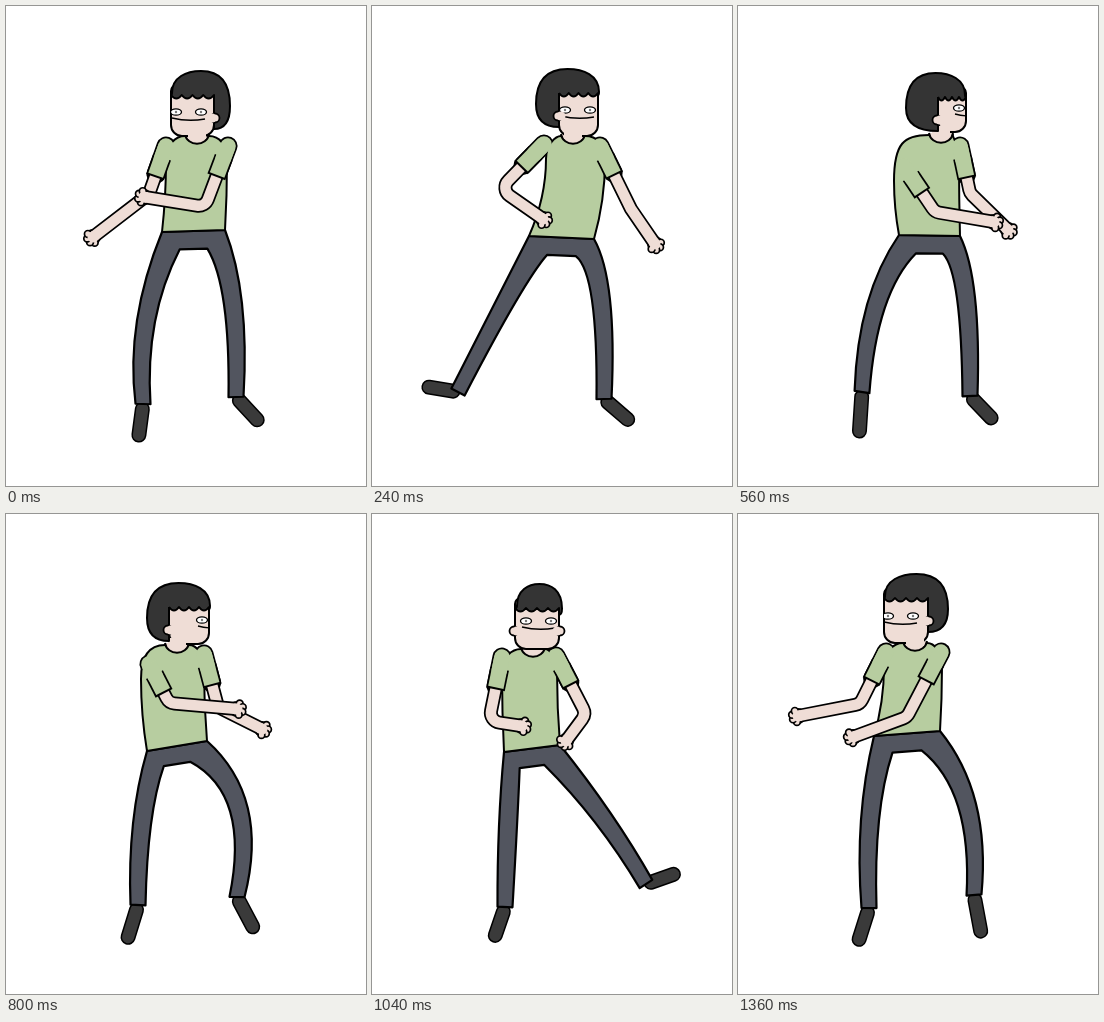
Animation, 360 px wide and 480 px high, one loop 1440 ms. Source, as an HTML page with a canvas:

```html
<!DOCTYPE html>
<html lang="en">
<head>
<meta charset="utf-8">
<title>Dancing figure</title>
<style>
  html, body { margin: 0; width: 100%; height: 100%; overflow: hidden; background: #fff; }
  canvas { display: block; }
</style>
</head>
<body>
<canvas id="stage" width="360" height="480"></canvas>
<script>
const ctx = document.getElementById('stage').getContext('2d');
const LOOP = 1440, STEP = 80;
const SKIN = '#efddd6', SHIRT = '#b7cda0', PANTS = '#52555f', HAIR = '#343434', SHOE = '#3a3a3a', INK = '#000';

// Key poses: one row per entry in TIMES.
const TIMES = [0, 240, 560, 800, 1040, 1200, 1360];

// hair left, hair right, face left, face right, top, chin, left eye x, eye y
const HEAD = [
  [166, 224, 165, 208, 65, 130, 170, 106],
  [164, 227, 187, 226, 63, 130, 193, 104],
  [168, 227, 200, 228, 67, 126, 221, 102],
  [141, 204, 163, 203, 69, 130, 196, 106],
  [145, 190, 143, 187, 70, 135, 154, 107],
  [138, 199, 136, 180, 69, 127, 137, 103],
  [147, 210, 146, 190, 60, 129, 150, 102]
];
// waist left x y, waist right x y, left side x, right side x, neck x y
const TORSO = [
  [156, 226, 219, 224, 160, 221, 191, 130],
  [157, 230, 222, 233, 174, 233, 201, 130],
  [161, 229, 222, 230, 156, 221, 203, 129],
  [141, 237, 201, 227, 135, 198, 171, 131],
  [132, 238, 188, 231, 130, 185, 161, 135],
  [131, 233, 187, 229, 128, 186, 163, 128],
  [136, 222, 202, 217, 146, 204, 177, 129]
];
// shoulder, elbow, hand of the left arm, then of the right arm
const ARMS = [
  [160, 140, 143, 188, 87, 231, 222, 140, 199, 201, 138, 191],
  [172, 138, 128, 183, 171, 213, 228, 140, 259, 203, 283, 238],
  [166, 160, 197, 206, 256, 216, 222, 140, 232, 187, 270, 224],
  [143, 150, 163, 189, 231, 195, 198, 140, 212, 193, 256, 215],
  [130, 143, 117, 207, 150, 212, 184, 142, 214, 200, 194, 227],
  [133, 133, 74, 166, 113, 203, 192, 145, 192, 215, 177, 262],
  [148, 138, 122, 190, 60, 202, 203, 138, 169, 203, 115, 223]
];
// knee, ankle, toe of the left leg, then of the right leg
const LEGS = [
  [140, 315, 137, 398, 132, 436, 227, 298, 230, 391, 256, 419],
  [135, 293, 86, 386, 50, 380, 229, 294, 232, 393, 261, 418],
  [138, 300, 124, 386, 121, 432, 228, 292, 232, 390, 258, 417],
  [136, 310, 132, 391, 120, 430, 233, 296, 231, 383, 250, 419],
  [136, 312, 133, 393, 121, 428, 231, 304, 274, 370, 308, 358],
  [136, 313, 134, 398, 117, 433, 237, 303, 268, 373, 303, 406],
  [132, 306, 131, 394, 119, 432, 229, 291, 236, 381, 244, 424]
];

const mod = (a, n) => ((a % n) + n) % n;
const clamp01 = v => Math.min(1, Math.max(0, v));
const mix = (a, b, f) => [a[0] + (b[0] - a[0]) * f, a[1] + (b[1] - a[1]) * f];
const toward = (a, b, d) => mix(a, b, d / (Math.hypot(b[0] - a[0], b[1] - a[1]) || 1));
const points = v => Array.from({ length: v.length / 2 }, (_, i) => [v[2 * i], v[2 * i + 1]]);

// Smooth cyclic spline through the rows of a table.
function sample(table, t) {
  const n = TIMES.length;
  const i = TIMES.filter(k => k <= t).length - 1;
  const timeAt = k => TIMES[mod(k, n)] + LOOP * Math.floor(k / n);
  const [t0, t1, t2, t3] = [i - 1, i, i + 1, i + 2].map(timeAt);
  const [a, b, c, d] = [i - 1, i, i + 1, i + 2].map(k => table[mod(k, n)]);
  const span = t2 - t1, u = (t - t1) / span;
  return b.map((p, j) => {
    const m1 = (c[j] - a[j]) / (t2 - t0) * span;
    const m2 = (d[j] - p) / (t3 - t1) * span;
    return p + u * m1 + u * u * (3 * (c[j] - p) - 2 * m1 - m2) + u * u * u * (2 * (p - c[j]) + m1 + m2);
  });
}

function paint(fill, line = 2) {
  ctx.fillStyle = fill;
  ctx.fill();
  if (!line) return;
  ctx.strokeStyle = INK;
  ctx.lineWidth = line;
  ctx.stroke();
}

function dot([x, y], rx, fill, line, ry = rx) {
  ctx.beginPath();
  ctx.ellipse(x, y, rx, ry, 0, 0, 7);
  paint(fill, line);
}

function bar(a, b, width, color, cap = 'round') {
  ctx.beginPath();
  ctx.moveTo(...a);
  ctx.lineTo(...b);
  ctx.lineCap = cap;
  ctx.lineWidth = width;
  ctx.strokeStyle = color;
  ctx.stroke();
}

// Quadratic from a to b that passes through mid.
function through(a, mid, b) {
  ctx.quadraticCurveTo(2 * mid[0] - (a[0] + b[0]) / 2, 2 * mid[1] - (a[1] + b[1]) / 2, ...b);
}

function beside(p, a, b, d) {
  const len = Math.hypot(b[0] - a[0], b[1] - a[1]) || 1;
  return [p[0] - (b[1] - a[1]) / len * d, p[1] + (b[0] - a[0]) / len * d];
}

function drawLegs(v, torso) {
  const [kneeL, ankleL, toeL, kneeR, ankleR, toeR] = points(v);
  const [waistL, waistR] = points(torso.slice(0, 4));
  for (const [ankle, toe] of [[ankleL, toeL], [ankleR, toeR]]) {
    const heel = toward(ankle, toe, 5), tip = toward(toe, ankle, 7);
    bar(heel, tip, 15, INK);
    bar(heel, tip, 12, SHOE);
  }
  const edge = (waist, knee, ankle, side) => [
    beside(knee, waist, ankle, 9 * side), beside(ankle, knee, ankle, 7.5 * side)];
  const [kneeLO, ankleLO] = edge(waistL, kneeL, ankleL, 1);
  const [kneeLI, ankleLI] = edge(waistL, kneeL, ankleL, -1);
  const [kneeRI, ankleRI] = edge(waistR, kneeR, ankleR, 1);
  const [kneeRO, ankleRO] = edge(waistR, kneeR, ankleR, -1);
  const [crotchL, crotchR] = [0.28, 0.72].map(f => {
    const p = mix(waistL, waistR, f);
    return [p[0], p[1] + 18];
  });
  ctx.beginPath();
  ctx.moveTo(...waistL);
  through(waistL, kneeLO, ankleLO);
  ctx.lineTo(...ankleLI);
  through(ankleLI, kneeLI, crotchL);
  ctx.lineTo(...crotchR);
  through(crotchR, kneeRI, ankleRI);
  ctx.lineTo(...ankleRO);
  through(ankleRO, kneeRO, waistR);
  ctx.closePath();
  paint(PANTS, 2.2);
}

function drawTorso([lx, ly, rx, ry, sideL, sideR, nx, ny], armL, armR) {
  for (const [shoulder, elbow] of [armL, armR]) bar(shoulder, toward(shoulder, elbow, 30), 19, INK);
  const pitL = armL[0][1] + 15, pitR = armR[0][1] + 15;
  ctx.beginPath();
  ctx.moveTo(nx - 12, ny);
  ctx.bezierCurveTo(sideL + 10, ny, sideL, ny + 8, sideL, pitL);
  ctx.quadraticCurveTo(sideL, (pitL + ly) / 2, lx, ly);
  ctx.lineTo(rx, ry);
  ctx.quadraticCurveTo(sideR, (pitR + ry) / 2, sideR, pitR);
  ctx.bezierCurveTo(sideR, ny + 8, sideR - 8, ny, nx + 12, ny);
  paint(SHIRT);
}

function drawArm([shoulder, elbow, hand]) {
  const cuff = toward(shoulder, elbow, 32);
  const forearm = (width, color) => {
    ctx.beginPath();
    ctx.moveTo(...toward(shoulder, elbow, 22));
    ctx.arcTo(...elbow, ...hand, 10);
    ctx.lineTo(...hand);
    ctx.lineCap = 'butt';
    ctx.lineWidth = width;
    ctx.strokeStyle = color;
    ctx.stroke();
  };
  forearm(14, INK);
  dot(hand, 7, SKIN, 2);
  const aim = Math.atan2(hand[1] - elbow[1], hand[0] - elbow[0]);
  for (const spread of [-1.2, -0.4, 0.4, 1.2]) {
    const a = aim + spread;
    dot([hand[0] + 6 * Math.cos(a), hand[1] + 6 * Math.sin(a)], 3.4, SKIN, 1.7);
  }
  dot(hand, 5.5, SKIN, 0);
  forearm(10.5, SKIN);
  bar(toward(shoulder, elbow, 12), toward(shoulder, elbow, 33), 19, INK, 'butt');
  bar(shoulder, toward(shoulder, elbow, 14), 15.5, SHIRT);
  bar(shoulder, toward(cuff, shoulder, 1), 15.5, SHIRT, 'butt');
}

function drawHead([hl, hr, fl, fr, top, chin, eyeX, eyeY], nx, ny) {
  const backL = clamp01((fl - hl) / 15), backR = clamp01((hr - fr) / 15);
  const fringe = top + 24, width = hr - hl;

  ctx.beginPath();
  ctx.moveTo(nx - 12, ny - 2);
  ctx.bezierCurveTo(nx - 10, ny + 11, nx + 10, ny + 11, nx + 12, ny - 2);
  paint(SKIN);

  ctx.beginPath();
  ctx.roundRect(fl, top + 14, fr - fl, chin - top - 14, [6, 6, 11, 11]);
  paint(SKIN);
  if (backL + backR > 0.6) {
    ctx.fillStyle = SKIN;
    ctx.fillRect(nx - 9, chin - 6, 18, 9);
  }

  ctx.save();
  ctx.beginPath();
  ctx.rect(fl, top, fr - fl, chin - top);
  ctx.clip();
  for (const x of [eyeX, eyeX + 25]) {
    dot([x, eyeY], 5.5, '#fff', 1.3, 3.2);
    dot([x, eyeY], 1.2, '#777', 0);
  }
  ctx.beginPath();
  ctx.moveTo(eyeX - 4, eyeY + 6);
  ctx.quadraticCurveTo(eyeX + 12, eyeY + 10, eyeX + 29, eyeY + 7);
  ctx.lineWidth = 1.4;
  ctx.stroke();
  ctx.restore();

  const lowL = fringe + 34 * backL, lowR = fringe + 34 * backR;
  const midL = top + 22 + 13 * backL, midR = top + 22 + 13 * backR;
  ctx.beginPath();
  ctx.moveTo(fl, fringe);
  ctx.lineTo(fl, lowL);
  ctx.quadraticCurveTo(hl, lowL, hl, midL);
  ctx.bezierCurveTo(hl, top + 6, hl + width * 0.25, top, hl + width / 2, top);
  ctx.bezierCurveTo(hr - width * 0.25, top, hr, top + 6, hr, midR);
  ctx.quadraticCurveTo(hr, lowR, fr, lowR);
  ctx.lineTo(fr, fringe);
  const tuft = (fr - fl) / 4;
  for (let i = 1; i <= 4; i++) {
    ctx.quadraticCurveTo(fr - (i - 0.5) * tuft, fringe + 7, fr - i * tuft, fringe);
  }
  paint(HAIR);

  const ear = (x, out) => {
    dot([x + out, top + 47], 4.5, SKIN, 1.8);
    dot([x - 2 * out, top + 47], 4.5, SKIN, 0);
  };
  if (backR < 0.7) ear(fl, -1);
  if (backL < 0.7) ear(fr, 1);
}

function draw(now) {
  const t = Math.floor(now % LOOP / STEP) * STEP;
  const head = sample(HEAD, t), torso = sample(TORSO, t);
  const joints = points(sample(ARMS, t));
  const armL = joints.slice(0, 3), armR = joints.slice(3);
  const facingRight = head[2] - head[0] > 10;

  ctx.clearRect(0, 0, 360, 480);
  ctx.lineJoin = 'round';
  drawLegs(sample(LEGS, t), torso);
  drawTorso(torso, armL, armR);
  (facingRight ? [armR, armL] : [armL, armR]).forEach(drawArm);
  drawHead(head, torso[6], torso[7]);
  requestAnimationFrame(draw);
}
requestAnimationFrame(draw);
</script>
</body>
</html>
```
